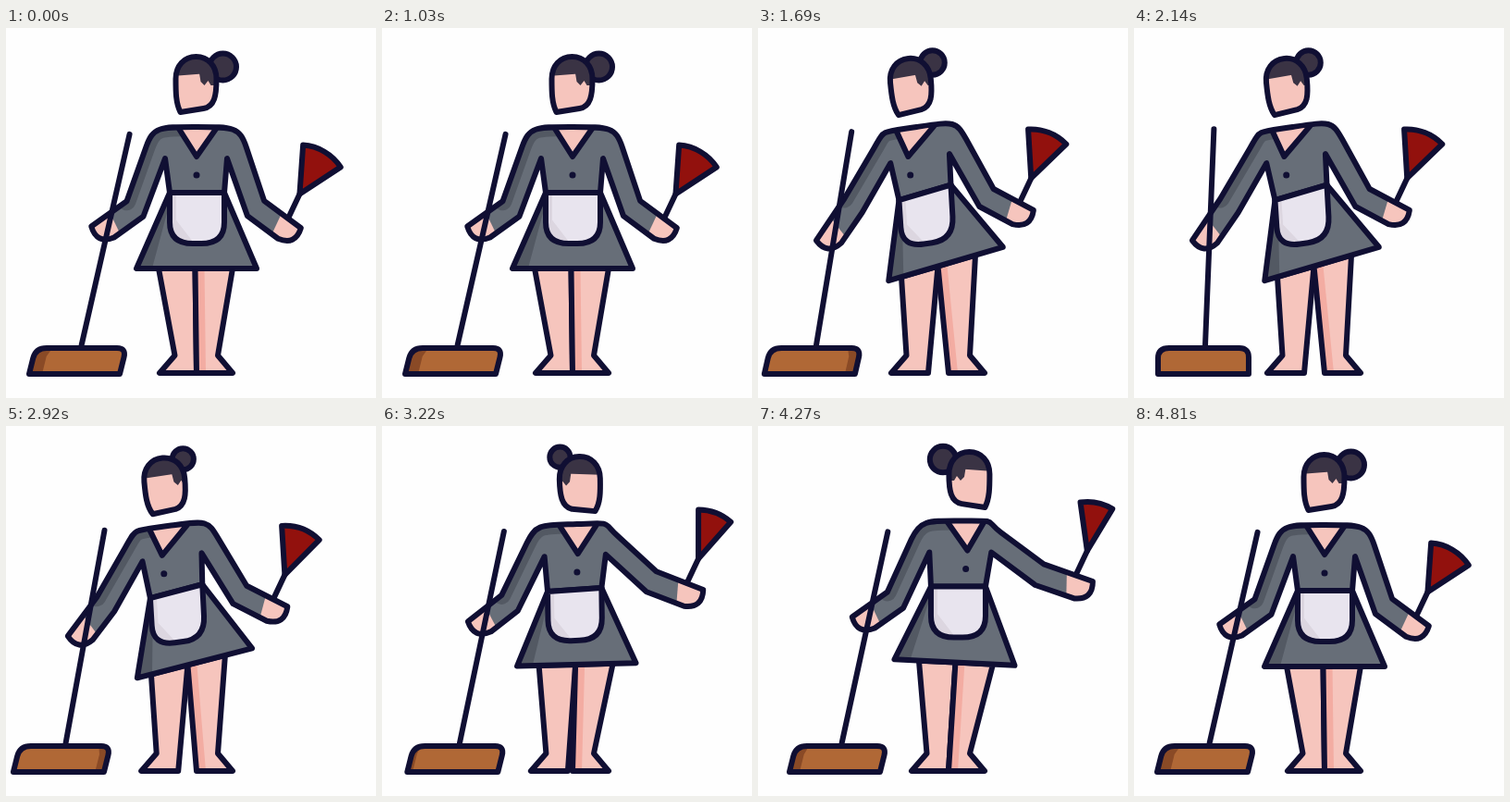
Animation of 400x400 px, one loop 4840 ms. Source, as an HTML page with a canvas:

```html
<!DOCTYPE html>
<html lang="en">
<head>
<meta charset="utf-8">
<title>Cleaning lady</title>
<style>
html, body { margin: 0; width: 100%; height: 100%; overflow: hidden; background: #fefefe; }
canvas { display: block; width: 100vw; height: 100vh; object-fit: contain; }
</style>
</head>
<body>
<canvas width="400" height="400"></canvas>
<script>
const ctx = document.querySelector('canvas').getContext('2d');
const LOOP = 4840, STEP = 30;
const INK = '#100f33', SKIN = '#f6c5bd', BLUSH = '#f3aca2', DRESS = '#676e78', DRESS_SHADE = '#535963',
  APRON = '#e8e4ee', APRON_SHADE = '#dcd6e0', HAIR = '#3a3344', RED = '#92110d', WOOD = '#b06836', WOOD_SHADE = '#8a4a26';

// Vector helpers
const add = (a, b, k = 1) => [a[0] + b[0] * k, a[1] + b[1] * k];
const sub = (a, b) => add(a, b, -1);
const mix = (a, b, k) => add(a, sub(b, a), k);
const unit = v => { const n = Math.hypot(...v); return [v[0] / n, v[1] / n]; };
const clamp = v => Math.min(1, Math.max(0, v));
const ease = (t, from, to) => { const u = clamp((t - from) / (to - from)); return u * u * (3 - 2 * u); };

// Path helpers; commands look like ['M', p] or ['C', p, q, r].
function shape(...commands) {
  return new Path2D(commands.map(([op, ...pts]) => op + pts.map(p => p.join(' ')).join(' ')).join(' '));
}
const poly = (...pts) => shape(['M', ...pts], ['Z']);
const line = (...pts) => shape(['M', ...pts]);
const disc = (x, y, r) => { const p = new Path2D(); p.arc(x, y, r, 0, 7); return p; };

function fill(path, color) { ctx.fillStyle = color; ctx.fill(path); }
function stroke(path, width = 6, color = INK) {
  ctx.lineWidth = width;
  ctx.strokeStyle = color;
  ctx.stroke(path);
}
function paint(path, color, details) {
  fill(path, color);
  if (details) {
    ctx.save();
    ctx.clip(path);
    details();
    ctx.restore();
  }
  stroke(path);
}

// lean: weight on the broom side; reach: weight on the duster side; both 0 at rest.
function poseAt(t) {
  const turn = ease(t, 2800, 3410);
  const lean = ease(t, 1030, 1580) - turn, reach = turn - ease(t, 4250, 4800);
  const step = 4 * Math.max(lean * (1 - lean), reach * (1 - reach));
  return {
    lean, reach, step,
    dip: 3.5 * step,
    lift: t < 1580 ? step : 0,
    stroke: (1 - Math.cos(2 * Math.PI * clamp((t - 1580) / 1140))) / 2,
    swing: reach * .08 * (1 - Math.cos(2 * Math.PI * (t - 4270) / 420))
  };
}
const blend = ({ lean, reach }, rest, left, right) => add(add(rest, sub(left, rest), lean), sub(right, rest), reach);

// Bends a resting torso point at the waist and tips the hips.
function warp({ lean, reach, dip }, x, y) {
  const below = clamp((y - 178) / 82), above = Math.max(0, 178 - y), side = x - 206;
  const tip = .15 + .13 * clamp((y - 141) / 37);
  return [
    x + lean * (23 * below - 26 - .12 * above - .05 * side) + reach * (10 - 3.5 * below + .09 * above),
    y - lean * (5 * below + side * tip) + reach * (.05 * side * below - 4.5) + dip
  ];
}

// Sleeve outline from the armpit, elbow and hand centres; side is 1 for the broom arm.
function makeArm(pit, elbow, hand, side) {
  const inward = v => [v[1] * side, -v[0] * side];
  const upper = unit(sub(elbow, pit)), fore = unit(sub(hand, elbow));
  const across = inward(unit(add(upper, fore)));
  const slant = add(add([0, 0], inward(fore), 12), fore, -6.5);
  const arm = {
    pit,
    shoulder: add(pit, inward(upper), -24),
    elbow: add(elbow, across, -12.2), inner: add(elbow, across, 12.2),
    hand: sub(hand, slant), wrist: add(hand, slant)
  };
  arm.palm = add(hand, [-slant[1] * side, slant[0] * side], 1.1);
  arm.bend = add(arm.shoulder, sub(arm.shoulder, arm.elbow), .38);
  return arm;
}

function drawLegs(pose, hemL, hemR) {
  const hip = 165 - 10 * pose.lean + 9 * pose.reach, foot = 166 - 22 * pose.lean;
  const onHem = x => mix(hemL, hemR, (x - hemL[0]) / (hemR[0] - hemL[0]));
  const middle = onHem(hip + 39.5);
  paint(poly(onHem(hip), [foot + 16.5, 354], [foot, 373], [foot + 40, 373], middle), SKIN);
  paint(poly(onHem(hip + 80), [229, 354], [245, 373], [206, 373], middle), SKIN, () =>
    fill(poly(middle, add(middle, [10, 0]), [216, 373], [206, 373]), BLUSH));
}

function drawHead({ lean, reach, step, dip }) {
  const turn = .45 * lean + 2.95 * reach, facing = Math.cos(turn), away = Math.sin(turn);
  const x = 205.5 - 43 * lean + 23 * reach, y = 31 + 2 * lean - 3 * reach + dip + 2 * step;
  paint(disc(x + 29 * facing, y + 11 - 15 * away, 14.5 - 7 * away * away), HAIR);
  ctx.save();
  ctx.translate(x, y);
  ctx.rotate(-.1 * lean);
  // The chin is pointed on the side she faces and round on the other.
  const jaw = (side, sharp) =>
    [[22, 24], [22, 42 - 4 * sharp], [20 + 2 * sharp, 54 - 4 * sharp], [8 + 9 * sharp, 56 + 4 * sharp]]
      .map(p => [p[0] * side, p[1]]);
  const right = jaw(1, (1 - facing) / 2), left = jaw(-1, (1 + facing) / 2);
  const head = shape(['M', left[0]], ['C', [-22, 10], [-13, 0], [0, 0]], ['C', [13, 0], [22, 10], right[0]],
    ['C', ...right.slice(1)], ['L', left[3]], ['C', left[2], left[1], left[0]], ['Z']);
  paint(head, SKIN, () => {
    fill(poly([-26, -5], [26, -5], [26, 19 - 2 * facing], [-26, 19 + 2 * facing]), HAIR);
    const side = Math.sign(facing), lock = 3 + 21 * (1 - Math.abs(facing));
    fill(poly(...[[0, 15], [2, 27], [6, 31], [10, 26], [13, 31], [30, 31], [30, 15]]
      .map(p => [(p[0] + lock) * side, p[1]])), HAIR);
  });
  ctx.restore();
}

function drawDuster({ lean, reach, swing }, arm) {
  const base = mix(arm.elbow, arm.hand, .65), tip = add(base, [12.5, -26.5]);
  const angle = .53 - .16 * lean - .33 * reach + swing - Math.PI / 2;
  const spread = .46 - .03 * lean - .12 * reach;
  stroke(line(base, tip));
  const fan = new Path2D();
  fan.moveTo(...tip);
  fan.arc(...tip, 53, angle - spread, angle + spread);
  fan.closePath();
  paint(fan, RED);
}

function drawSkirt(waistL, waistR, hemL, hemR) {
  paint(poly(waistL, hemL, hemR, waistR), DRESS, () =>
    fill(poly(waistL, hemL, mix(hemL, hemR, .13), add(waistL, [3, 0])), DRESS_SHADE));
}

function drawBody(pose, leftArm, rightArm, waistL, waistR) {
  const facing = 7 * pose.reach - 13 * pose.lean;
  const collarL = add(warp(pose, 187, 109), [facing, 0], .3), collarR = add(warp(pose, 227, 109), [facing, 0], .1);
  const neckline = add(warp(pose, 206, 139), [facing, 0]), button = add(warp(pose, 206, 159), [facing, 0]);
  const top = warp(pose, 206, 107), across = sub(collarR, collarL);
  const toTop = ['C', leftArm.bend, add(top, across, -1), top];
  const body = shape(['M', leftArm.hand], ['L', leftArm.elbow, leftArm.shoulder], toTop,
    ['C', add(top, across), rightArm.bend, rightArm.shoulder], ['L', rightArm.elbow, rightArm.hand],
    ['Q', rightArm.palm, rightArm.wrist],
    ['L', rightArm.inner, rightArm.pit, waistR, waistL, leftArm.pit, leftArm.inner, leftArm.wrist],
    ['Q', leftArm.palm, leftArm.hand], ['Z']);
  paint(body, DRESS, () => {
    stroke(shape(['M', leftArm.elbow], ['L', leftArm.shoulder], toTop), 20, DRESS_SHADE);
    fill(poly(collarL, add(top, [0, -6]), collarR, neckline), SKIN);
    for (const { elbow, hand, palm, wrist, inner } of [leftArm, rightArm])
      fill(poly(mix(elbow, hand, .47), hand, palm, wrist, mix(inner, wrist, .8)), SKIN);
  });
  stroke(line(collarL, neckline, collarR));
  fill(disc(...button, 3.5), INK);
}

function drawApron(waistL, waistR) {
  const width = sub(waistR, waistL);
  const low = add(mix(waistL, waistR, .5), [-.2 * width[1], 55]);
  const half = [width[0] / 2, width[1] / 4], lowL = sub(low, half), lowR = add(low, half);
  const sideL = mix(waistL, lowL, .58), sideR = mix(waistR, lowR, .58);
  const apron = shape(['M', waistL], ['L', sideL], ['Q', lowL, mix(lowL, lowR, .42)],
    ['L', mix(lowL, lowR, .58)], ['Q', lowR, sideR], ['L', waistR], ['Z']);
  paint(apron, APRON, () => stroke(line(waistL, sideL, mix(lowL, lowR, .3)), 14, APRON_SHADE));
}

// The pole runs from the broom head through the hand.
function drawBroom({ lean, reach, lift, stroke: sweep }, hand) {
  const x = 25 - 20 * lean + 9 * reach + 21 * sweep - 3 * lift, y = 374 - 14 * lift;
  const skew = 7 - 7 * sweep, shade = 14 - 26 * lean - 3 * reach + 12 * sweep;
  const base = [x + 51 + skew * .8, y - 31];
  stroke(line(base, add(base, unit(sub(add(hand, [5, 0]), base)), 234)));
  const at = (px, up) => [x + px + skew * up / 28, y - up];
  const head = shape(['M', at(0, 0)], ['L', at(0, 17)], ['Q', at(0, 28), at(12, 28)], ['L', at(88, 28)],
    ['Q', at(98, 28), at(98, 18)], ['L', at(98, 0)], ['Z']);
  paint(head, WOOD, () => {
    const edge = shade > 0 ? 0 : 98, inner = edge + shade;
    fill(poly(at(edge, 0), at(edge, 28), at(inner + shade * .3, 28), at(inner, 19), at(inner, 0)), WOOD_SHADE);
  });
}

function draw(t) {
  ctx.fillStyle = '#fefefe';
  ctx.fillRect(0, 0, 400, 400);
  ctx.lineJoin = ctx.lineCap = 'round';
  const pose = poseAt(t), sink = [0, pose.dip];
  const waistL = warp(pose, 177, 178), waistR = warp(pose, 236, 178);
  const hemL = warp(pose, 141, 260), hemR = warp(pose, 271, 260);

  const broomHand = add(blend(pose, [104.5, 220.5], [76.5, 231], [114, 212.5]), [-8, -8], pose.lift);
  const leftArm = makeArm(warp(pose, 172, 141),
    add(blend(pose, [139.5, 195.5], [103, 192], [148.5, 188]), sink), broomHand, 1);
  const rightArm = makeArm(warp(pose, 239, 141),
    add(blend(pose, [270, 195], [247, 183.5], [304.5, 160.5]), sink),
    add(blend(pose, [306.5, 222], [286.5, 204.5], [352, 177]), sink), -1);

  drawLegs(pose, hemL, hemR);
  drawDuster(pose, rightArm);
  drawSkirt(waistL, waistR, hemL, hemR);
  drawBody(pose, leftArm, rightArm, waistL, waistR);
  drawApron(waistL, waistR);
  drawHead(pose);
  drawBroom(pose, broomHand);
}

const start = performance.now();
function frame() {
  const t = (performance.now() - start) % LOOP;
  draw(t < 1030 ? 0 : t - (t - 1030) % STEP);
  requestAnimationFrame(frame);
}
frame();
</script>
</body>
</html>
```
